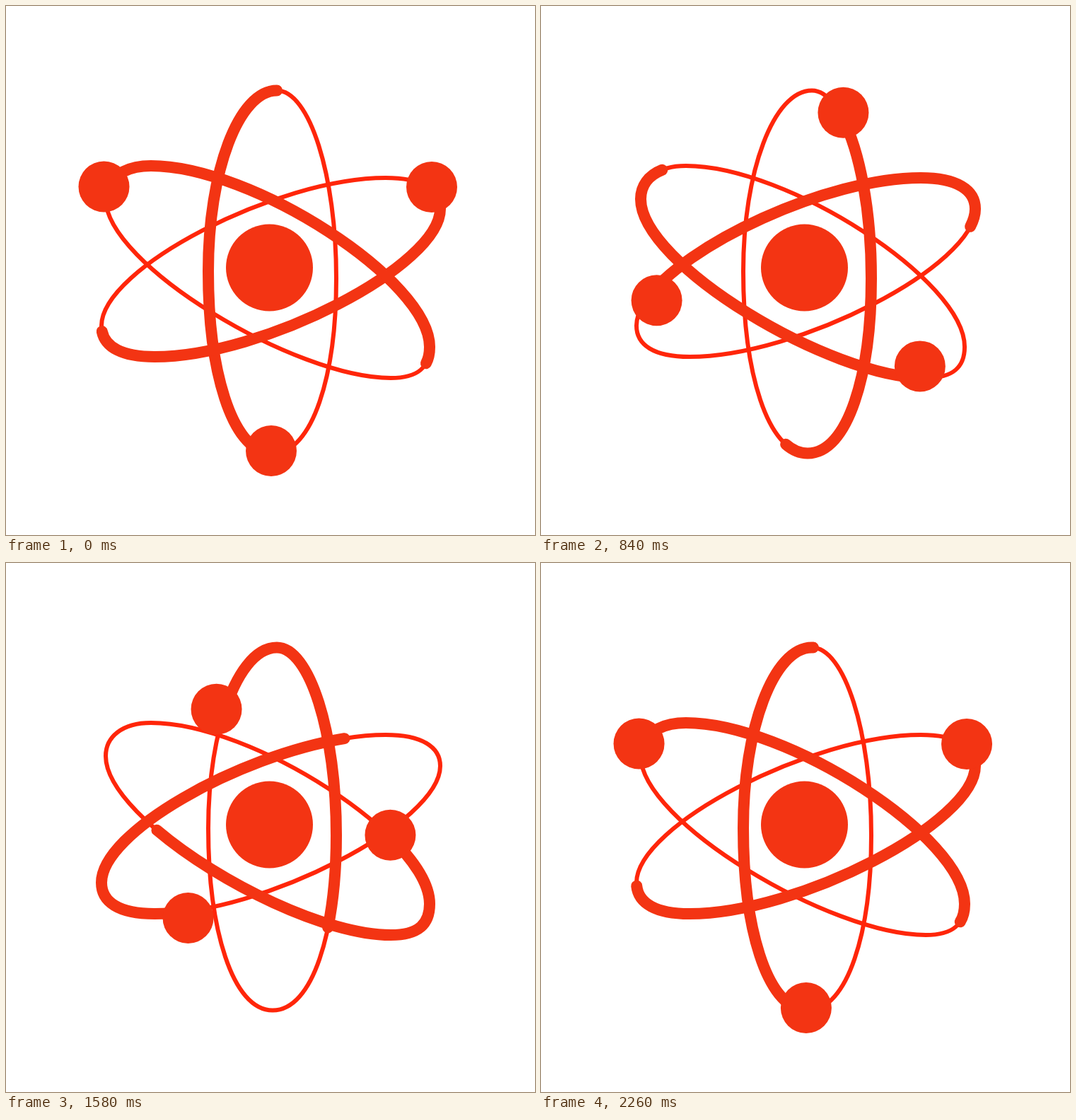
Animation, 748 px wide and 748 px high, one loop 2280 ms. Source, as an HTML page with a canvas:

```html
<!DOCTYPE html>
<html lang="en">
<head>
<meta charset="utf-8">
<title>Atom</title>
<style>
  html, body { margin: 0; width: 100%; height: 100%; overflow: hidden; background: #fff; }
  canvas { display: block; }
</style>
</head>
<body>
<canvas id="stage" width="748" height="748"></canvas>
<script>
const ctx = document.getElementById('stage').getContext('2d');
const LOOP = 2280, TURN = 1083, STEP = 20;
const SOLID = '#f33413', LINE = '#ff260a';

// Each orbit: its closed ring, the electron's way out and back, and the
// trail's ends as ring fractions at the start, the turn and the end.
const orbits = [
  {
    ring: 'M383 119.5C329 119.5 286 234 286 375C286 517 320 632.5 377 632.5C434 632.5 467 521 467 385C467 239 429 119.5 383 119.5Z',
    legs: ['M375 629C510 629 498 116 379 116', 'M379 116C237 116 251 629 375 629'],
    tail: [0, 0.53, 0.998],
    head: [0.5, 1, 1.5]
  },
  {
    ring: 'M135 452C135 479 159 496 210 496C364 496 614 367 614 287C614 260 588 243 537 243C383 243 135 371 135 452Z',
    legs: ['M602 256C510 180 130 365 144 470', 'M144 470C190 590 634 378 602 256'],
    tail: [0.007, 0.533, 1.004],
    head: [0.523, 1.018, 1.523]
  },
  {
    ring: 'M599 482C599 388 348 226 205 226C164 226 141 246 141 273C141 365 409 526 544 526C585 526 599 509 599 482Z',
    legs: ['M138.5 255.5C98 350 530 575 590 491', 'M590 491C660 385 199 172 138.5 255.5'],
    tail: [-0.021, 0.511, 0.977],
    head: [0.486, 0.99, 1.486]
  }
];

function measure(d) {
  const path = document.createElementNS('http://www.w3.org/2000/svg', 'path');
  path.setAttribute('d', d);
  return { path, length: path.getTotalLength() };
}

for (const orbit of orbits) {
  orbit.shape = new Path2D(orbit.ring);
  orbit.length = measure(orbit.ring).length;
  orbit.legs = orbit.legs.map(measure);
}

// Ease with flat ends; x1 and x2 set how long it lingers at each end.
function ease(x, x1, x2) {
  let low = 0, high = 1;
  for (let i = 0; i < 30; i++) {
    const s = (low + high) / 2, r = 1 - s;
    if (3 * x1 * s * r * r + 3 * x2 * s * s * r + s * s * s < x) low = s;
    else high = s;
  }
  return low * low * (3 - 2 * low);
}

function disc(x, y, radius) {
  ctx.beginPath();
  ctx.arc(x, y, radius, 0, 2 * Math.PI);
  ctx.fill();
}

function drawTrail(orbit, from, to) {
  const { length, shape } = orbit;
  const start = ((from % 1) + 1) % 1;
  const span = (to - from) * length;
  ctx.setLineDash([span, length - span]);
  ctx.lineDashOffset = -start * length;
  ctx.stroke(shape);
  ctx.setLineDash([]);
}

function draw(time) {
  const leg = time < TURN ? 0 : 1;
  const p = leg === 0
    ? ease(time / TURN, 0.845, 0.48)
    : ease((time - TURN) / (LOOP - TURN), 0.763, 0.26);
  const between = keys => keys[leg] + (keys[leg + 1] - keys[leg]) * p;

  ctx.fillStyle = '#fff';
  ctx.fillRect(0, 0, 748, 748);

  ctx.strokeStyle = LINE;
  ctx.lineWidth = 6;
  for (const orbit of orbits) ctx.stroke(orbit.shape);

  ctx.strokeStyle = ctx.fillStyle = SOLID;
  ctx.lineWidth = 16;
  ctx.lineCap = 'round';
  for (const orbit of orbits) {
    drawTrail(orbit, between(orbit.tail), between(orbit.head));
    const { path, length } = orbit.legs[leg];
    const spot = path.getPointAtLength(p * length);
    disc(spot.x, spot.y, 36);
  }
  disc(372.5, 370, 61.5);
}

let begin;
function tick(now) {
  begin ??= now;
  draw(Math.floor(((now - begin) % LOOP) / STEP) * STEP);
  requestAnimationFrame(tick);
}
draw(0);
requestAnimationFrame(tick);
</script>
</body>
</html>
```
